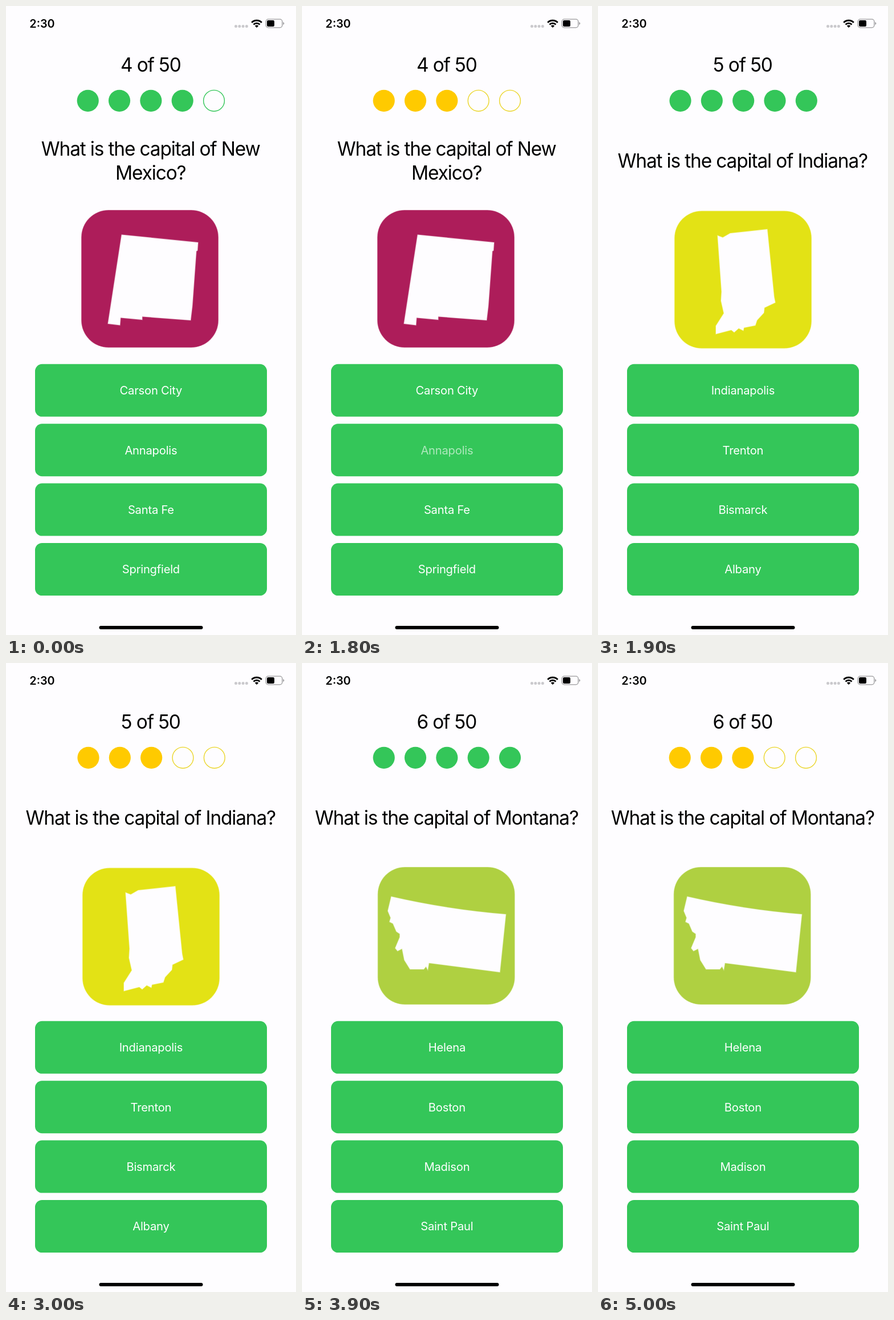
An HTML page for the animation above (6000 ms loop, 509 px wide and 1101 px high).

```html
<!DOCTYPE html>
<html lang="en">
<head>
<meta charset="utf-8">
<title>State capitals quiz</title>
<style>
  html, body { margin: 0; width: 100%; height: 100%; overflow: hidden; background: #fefdff; }
  svg { display: block; width: 100%; height: 100%; }
  text { font-family: Inter, "Liberation Sans", sans-serif; font-optical-sizing: none; text-anchor: middle; }
  .heading { font-size: 33.4px; letter-spacing: -.034em; }
  .answer { font-size: 20.2px; letter-spacing: -.011em; fill: #fff; }
  .clock { font-size: 19.8px; font-weight: 600; }
  .icon { stroke: #fff; stroke-opacity: .35; stroke-width: 1.6; }
</style>
</head>
<body>
<svg viewBox="0 0 509 1101">
  <rect width="509" height="1101" fill="#fefdff"/>
  <text class="clock" x="63.5" y="37.5">2:30</text>
  <path d="M403.5 35.5H424" stroke="#cac9cd" stroke-width="5" stroke-linecap="round" stroke-dasharray="0 6.3"/>
  <path d="M431.2 28.9a12.4 12.4 0 0 1 17.6 0M434.5 32.4a7.8 7.8 0 0 1 11 0" fill="none" stroke="#000" stroke-width="2.8"/>
  <path d="M440 38l-3.2-3.3a4.6 4.6 0 0 1 6.4 0z"/>
  <rect x="456.2" y="23.2" width="28.6" height="14.6" rx="4" fill="none" stroke="#99989b" stroke-width="1.3"/>
  <rect x="458" y="25" width="13" height="11" rx="2.2"/>
  <path d="M486.3 28q2 .7 2 2.5t-2 2.5z" fill="#99989b"/>
  <g id="quiz"></g>
  <rect x="163.5" y="1085" width="182" height="6" rx="3"/>
</svg>
<script>
const LOOP = 6000, SECOND = 1000, SECONDS_ALLOWED = 5, PRESS_TIME = 100;
const GREEN = '#34c659', YELLOW = '#ffca00', YELLOW_RING = '#ebd62b';

// A start just before a whole second makes the first tick follow at once.
const questions = [
  {
    number: 4, start: -100, lines: ['What is the capital of New', 'Mexico?'],
    answers: ['Carson City', 'Annapolis', 'Santa Fe', 'Springfield'], picked: 1,
    color: '#ad1d5a', icon: [132, 357], dotX: 143.7,
    outline: 'M71 43.5L205 57 204 71 202 72 195 168 192 193 107 186.5V192L69 188.5 68 201.5 47 199Z'
  },
  {
    number: 5, start: 1900, lines: ['What is the capital of Indiana?'],
    answers: ['Indianapolis', 'Trenton', 'Bismarck', 'Albany'],
    color: '#e3e215', icon: [134, 358.5], dotX: 144.5,
    outline: 'M76 43.5L85 47 98 39.5 163 32.5 175 150.5 177 160.5 158 169.5 157 178.5 145 191.5 142 200.5 122 204.5 121 209.5 113 205.5 105 212.5 100 208.5 73 215.5V201.5L87 179.5 82 157.5 83 141.5Z'
  },
  {
    number: 6, start: 3900, lines: ['What is the capital of Montana?'],
    answers: ['Helena', 'Boston', 'Madison', 'Saint Paul'],
    color: '#afd041', icon: [132.7, 357], dotX: 143.7,
    outline: 'M24 52Q122 74.5 225 83L214.5 184 90 168 88 180 85 174 81 179 57 179 47 163 43 143 35 147 31 142 39 123 39 117 33 113 27 99 21 96 23 89 18 77Z'
  }
];

const quiz = document.getElementById('quiz');
const heading = (text, y) => `<text class="heading" x="253.8" y="${y}">${text}</text>`;

function dots(left, x) {
  const low = left <= SECONDS_ALLOWED / 2 + 1;
  return Array.from({ length: SECONDS_ALLOWED }, (_, i) => {
    const style = i < left
      ? `r="19.1" fill="${low ? YELLOW : GREEN}"`
      : `r="18.4" fill="none" stroke="${low ? YELLOW_RING : GREEN}" stroke-width="1.4"`;
    return `<circle cx="${x + i * 55.33}" cy="165.8" ${style}/>`;
  }).join('');
}

function stateIcon({ icon, color, outline }) {
  return `<g class="icon" transform="translate(${icon})">
    <rect width="241" height="241" rx="48" fill="${color}"/>
    <path d="${outline}" fill="#fefdff"/></g>`;
}

function button(text, i, pressed) {
  const y = 626.8 + i * 104.4;
  return `<rect x="51" y="${y}" width="407" height="92" rx="12.3" fill="${GREEN}"/>
    <text class="answer" x="254.4" y="${y + 53.4}" opacity="${pressed ? 0.6 : 1}">${text}</text>`;
}

function draw(time) {
  const index = questions.findLastIndex(q => q.start <= time);
  const q = questions[index], next = questions[index + 1];
  const ticks = Math.floor(time / SECOND) - Math.floor(q.start / SECOND);
  const pressing = next && time >= next.start - PRESS_TIME;
  const firstLine = 304 - 21 * q.lines.length;
  return heading(`${q.number} of 50`, 114.7)
    + dots(SECONDS_ALLOWED - ticks, q.dotX)
    + q.lines.map((line, i) => heading(line, firstLine + i * 42)).join('')
    + stateIcon(q)
    + q.answers.map((text, i) => button(text, i, pressing && i === q.picked)).join('');
}

let shown;
function tick() {
  const picture = draw(performance.now() % LOOP);
  if (picture !== shown) quiz.innerHTML = shown = picture;
  requestAnimationFrame(tick);
}
tick();
</script>
</body>
</html>
```
